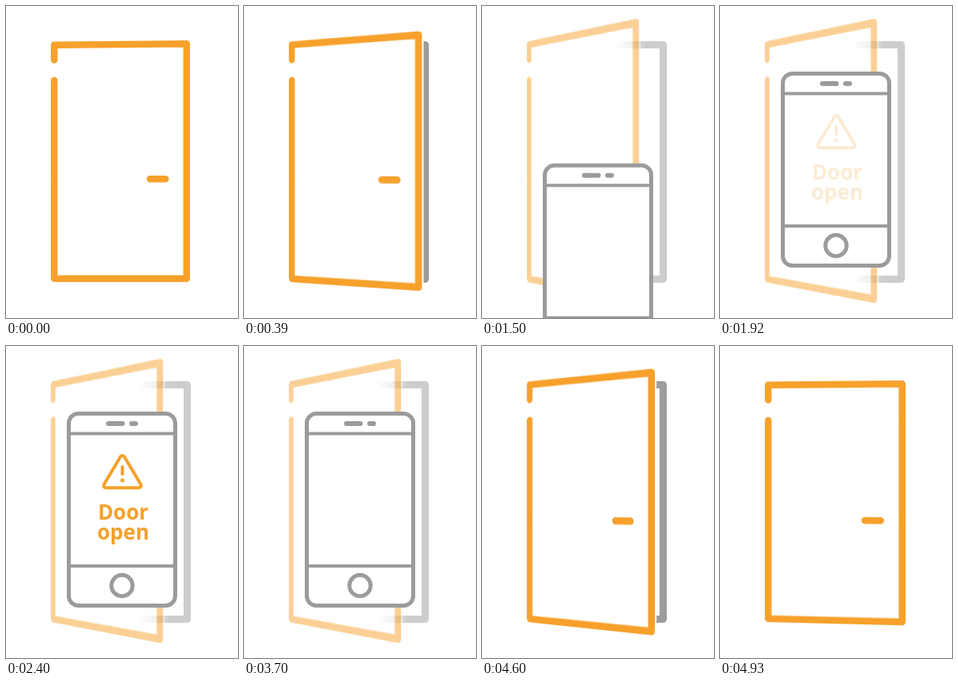
Animation, 290 px wide and 390 px high, one loop 5460 ms. Source, as an HTML page:

```html
<!DOCTYPE html>
<html lang="en">
<head>
<meta charset="utf-8">
<title>Door open alert</title>
<style>
  html, body { margin: 0; width: 100%; height: 100%; overflow: hidden; background: #fff; }
  #stage { position: relative; width: 100%; height: 100%; overflow: hidden; contain: strict; }
  svg { position: absolute; left: 0; top: 0; width: 290px; height: 390px; overflow: hidden;
        fill: none; stroke-linecap: round; stroke-linejoin: round; }
  #door { transform-origin: 56px 196px; stroke: #f7a12c; stroke-width: 8.4; }
  #phone { stroke: #9b9b9b; stroke-width: 5; }
  #alert { stroke: #f5a02c; stroke-width: 4; }
  text { font: bold 26px "Open Sans", "Noto Sans", sans-serif; text-anchor: middle;
         fill: #f5a02c; stroke: none; }
</style>
</head>
<body>
<div id="stage">
  <svg id="frame" viewBox="0 0 290 390">
    <linearGradient id="fade" gradientUnits="userSpaceOnUse" x1="166" x2="204" y1="0" y2="0">
      <stop stop-color="#9c9c9c" stop-opacity="0"/>
      <stop offset="1" stop-color="#9c9c9c"/>
    </linearGradient>
    <path d="M166 48.5H226.5V341.5H166" stroke="url(#fade)" stroke-width="9" stroke-linecap="butt"/>
  </svg>

  <svg id="door" viewBox="0 0 290 390">
    <rect x="56" y="42" width="176" height="305" fill="#fff" stroke="none"/>
    <path d="M60.3 67.500V48.800L225.800 47.300V340.800H60.300V93M180 216.300H199.500"/>
  </svg>

  <svg viewBox="0 0 290 390">
    <g id="phone">
      <rect x="78.5" y="84.5" width="133" height="240" rx="12" fill="#fff"/>
      <path d="M79 109.5H211M79 275H211" stroke-width="4"/>
      <path d="M128 97H145.5M157 97H162" stroke-width="6"/>
      <circle cx="145" cy="299.5" r="13.2"/>
    </g>
    <g id="alert">
      <path d="M143 138.5Q145.5 135.5 148 138.5L168.5 173Q170 177 166 177.3H125Q121 177 122.5 173Z"/>
      <path d="M145.5 151V160"/>
      <circle cx="145.5" cy="168" r="2.5" fill="#f5a02c" stroke="none"/>
      <text x="146.5" y="217">Door</text>
      <text x="146.5" y="241.5">open</text>
    </g>
  </svg>
</div>

<script>
const LOOP = 5460, STEP = 30, EXIT = 3700;
const DOOR_WIDTH = 174, HINGE = 56;

// Each track lists [time in ms, value] pairs.
const swing = [[0, 1], [570, 1.111], [750, 1.15], [880, 1.181],
               [4330, 1.181], [4810, 1.046], [4930, 1.014]];
const sag = [[4330, 0], [4810, 2], [4930, 2.2]];
const dim = [[990, 1], [1500, 0.5], [EXIT, 0.5], [4300, 1]];
const drop = [[990, 308], [1803, 0], [EXIT, 0], [4326, 308]];
const appear = [[1800, 0], [2400, 1]];

// Right edge of the door for each perspective scale.
const edge = [[1, 230], [1.014, 232], [1.046, 229], [1.11, 215], [1.15, 201.5], [1.181, 196.3]];

const [frame, door, phone, alertBox] =
  ["frame", "door", "phone", "alert"].map(id => document.getElementById(id));

function at(track, x) {
  if (x <= track[0][0]) return track[0][1];
  for (let i = 1; i < track.length; i++) {
    const [x0, y0] = track[i - 1], [x1, y1] = track[i];
    if (x <= x1) return y0 + (y1 - y0) * (x - x0) / (x1 - x0);
  }
  return track[track.length - 1][1];
}

function doorMatrix(scale, sagging) {
  const squeeze = (at(edge, scale) - HINGE) / (DOOR_WIDTH * scale);
  const depth = (1 - 1 / scale) / DOOR_WIDTH;
  const slope = sagging / DOOR_WIDTH;
  return `matrix3d(${squeeze},${slope},0,${-depth}, 0,1,0,0, 0,0,1,0, 0,0,0,1)`;
}

function draw(time) {
  const base = time < EXIT ? 0 : EXIT;
  const t = base + Math.floor((time - base) / STEP) * STEP;
  door.style.transform = doorMatrix(at(swing, t), at(sag, t));
  door.style.opacity = frame.style.opacity = at(dim, t);
  phone.setAttribute("transform", `translate(0 ${at(drop, t)})`);
  alertBox.style.opacity = t < EXIT ? at(appear, t) : 0;
}

const start = performance.now();
function tick() {
  draw((performance.now() - start) % LOOP);
  requestAnimationFrame(tick);
}
tick();
</script>
</body>
</html>
```
